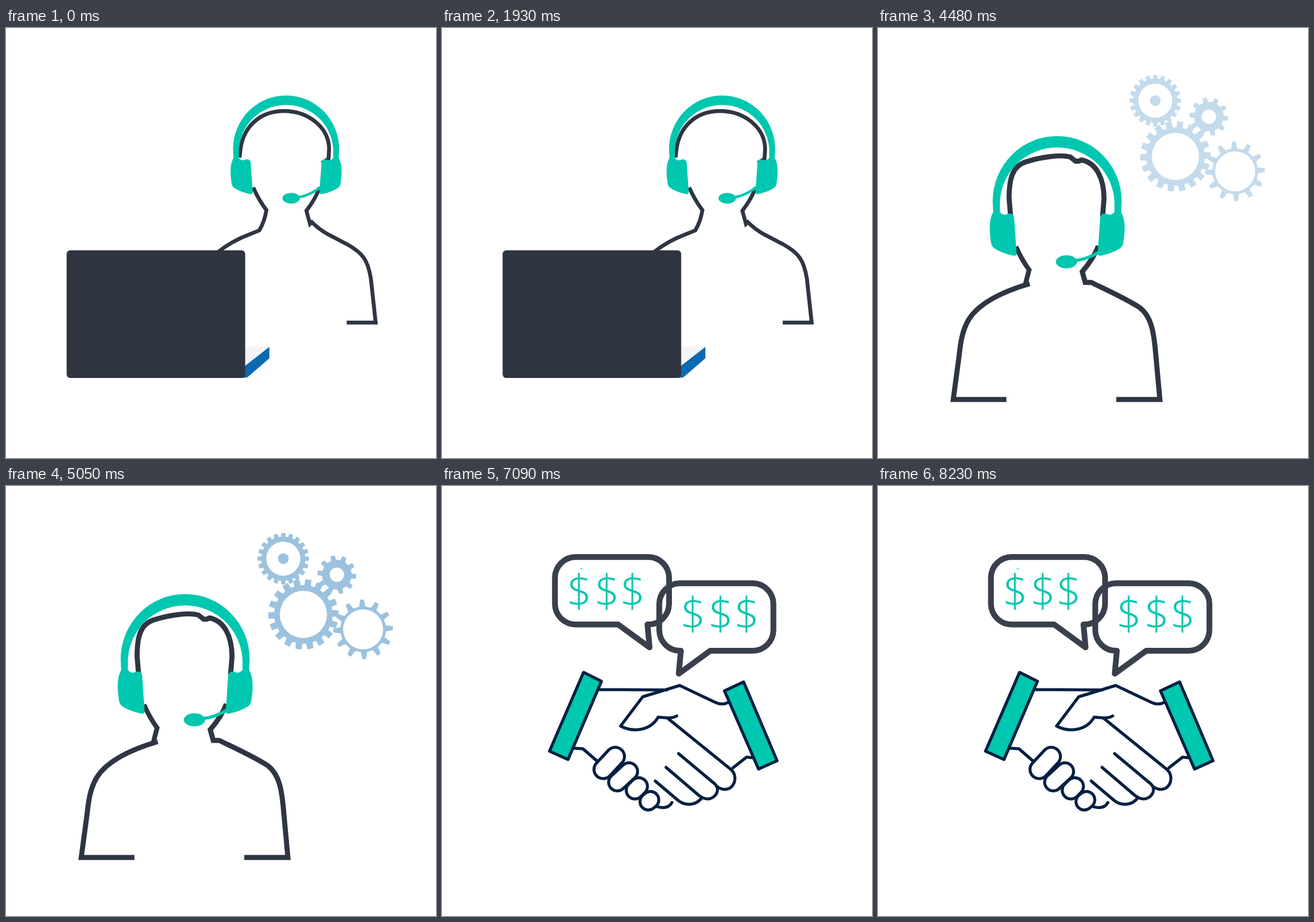
These frames come from a looping animation (720 by 720 pixels, 8260 ms). An HTML page with a canvas:

```html
<!DOCTYPE html>
<html lang="en">
<head>
<meta charset="utf-8">
<title>Support to deal</title>
<style>
html, body { margin: 0; width: 100%; height: 100%; overflow: hidden; background: #fff; }
canvas { display: block; width: 720px; height: 720px; }
</style>
</head>
<body>
<canvas id="stage" width="720" height="720"></canvas>
<script>
const ctx = document.getElementById('stage').getContext('2d');
const LOOP = 8260;
const DARK = '#2f3542', TEAL = '#00c7af', BLUE = '#0a69b1', NAVY = '#051f42', BUBBLE = '#3a3f4c';

function stroke(d, color, width, cap = 'butt', join = 'miter') {
  ctx.strokeStyle = color;
  ctx.lineWidth = width;
  ctx.lineCap = cap;
  ctx.lineJoin = join;
  ctx.stroke(new Path2D(d));
}

function fill(d, color) {
  ctx.fillStyle = color;
  ctx.fill(new Path2D(d), 'evenodd');
}

// Fades a whole group evenly by veiling it in white; call before the still parts.
function fadeGroup(alpha, draw) {
  if (alpha <= 0) return;
  draw();
  ctx.fillStyle = `rgba(255, 255, 255, ${1 - alpha})`;
  ctx.fillRect(0, 0, 720, 720);
}

// Piecewise linear value through [time, value] stops; 0 before the first one.
function track(t, stops) {
  if (t < stops[0][0]) return 0;
  for (let i = 1; i < stops.length; i++) {
    const [t0, v0] = stops[i - 1], [t1, v1] = stops[i];
    if (t < t1) return v0 + (v1 - v0) * (t - t0) / (t1 - t0);
  }
  return stops[stops.length - 1][1];
}

const EAR_CUP = 'M194 306L204 308Q209 314 215 312Q227 308 228 318L232 376Q232 383 226 381Q207 377 195 369Q190 366 189 358Q187 346 187 335Q187 317 194 306Z';

function headset(micX, micY, boomY) {
  fill('M193 310L192 290A108 109 0 0 1 408 290L407 310L396 309V295A96 95 0 0 0 204 295V309Z', TEAL);
  fill(EAR_CUP, TEAL);
  ctx.save();
  ctx.translate(600, 0);
  ctx.scale(-1, 1);
  fill(EAR_CUP, TEAL);
  ctx.restore();
  stroke(`M${micX + 14} ${micY - 2}Q${micX + 35} ${micY - 4} 372 ${boomY}`, TEAL, 5.5);
  ctx.beginPath();
  ctx.ellipse(micX, micY, 17.7, 11, 0, 0, 7);
  ctx.fill();
}

// A speech bubble with its tail at the lower right.
function bubble(bottom) {
  const side = bottom - 39;
  stroke(`M231 ${bottom}H152A39 39 0 0 1 112.5 ${side}V187A39 39 0 0 1 152 148H287A39 39 0 0 1 326.5 187V${side}A39 39 0 0 1 286 ${bottom}L290 317.5Z`,
    BUBBLE, 10.8, 'round', 'round');
}

function chat() {
  bubble(273);
  stroke('M155 182.3H263M158.5 209.8H193.5M235.5 209.8H290M213 237.2H290', BUBBLE, 10.8, 'round');
}

function agentAtDesk(t) {
  fadeGroup(track(t, [[970, 1], [1540, 1], [1930, 0]]), chat);
  stroke('M391 217Q392 206 394 195C402 160 430 139 465 139C508 139 541 168 541 203L540 219L529 226', DARK, 6.5);
  stroke('M414 267Q422 286 436 305Q433 324 424 339L409 345Q377 357 354 376', DARK, 6.5);
  stroke('M525 267Q519 285 503 306L509 328L512 325Q524 337 540 346L571 362C598 377 606 389 611 420L619 493.3H570.5', DARK, 6.5);
  ctx.save();
  ctx.translate(376, 113);
  ctx.scale(1 / 1.215, 1 / 1.213);
  ctx.translate(-187, -181);
  headset(310.3, 389.6, 366);
  ctx.restore();
  fill('M399 533H438L441 535L399 569Z', '#f4f5f6');
  fill('M441 534V553L404 585L396 586V569Z', BLUE);
  ctx.fillStyle = '#2e3440';
  ctx.beginPath();
  ctx.roundRect(101.5, 372.3, 299, 213.7, 6);
  ctx.fill();
}

// Tooth widths are shares of the pitch at the root and at the tip.
function gear(x, y, inner, root, tip, teeth, turn, rootWidth, tipWidth) {
  const step = Math.PI * 2 / teeth;
  const corners = [[root, -rootWidth], [tip, -tipWidth], [tip, tipWidth], [root, rootWidth]];
  ctx.beginPath();
  for (let i = 0; i < teeth; i++) {
    for (const [r, k] of corners) {
      const a = turn + (i + k / 2) * step;
      ctx.lineTo(x + r * Math.cos(a), y + r * Math.sin(a));
    }
  }
  ctx.closePath();
  ctx.moveTo(x + inner, y);
  ctx.arc(x, y, inner, 0, Math.PI * 2);
  ctx.fillStyle = BLUE;
  ctx.fill('evenodd');
}

function gears() {
  gear(464.3, 121.7, 28.5, 37, 43.2, 20, 0, .65, .5);
  ctx.beginPath();
  ctx.arc(464.3, 121.7, 9, 0, Math.PI * 2);
  ctx.fill();
  gear(554, 148.5, 12, 25, 32.5, 10, .09, .55, .35);
  gear(498, 215, 39.5, 49, 59, 18, -.03, .65, .5);
  gear(598, 240, 33.5, 38.5, 50, 12, -.04, .5, .25);
}

function agent(t) {
  fadeGroup(track(t, [[4000, 1], [4600, .05], [4750, .05], [5560, 1]]), gears);
  stroke('M222 315L219.5 285C219.5 250 226 231 248 224C270 217 305 211 322 216L331 223H336L341 221C366 226 378 252 378.5 285L376 316', DARK, 8.5);
  stroke('M231 366Q240 387 253 405L247 428', DARK, 8);
  stroke('M254 428C220 438 172 456 152 488C139 510 138 532 135 555L126 622H215', DARK, 8.5);
  stroke('M369 365Q361 386 342 408L347 426H357C386 440 415 453 438 468C460 484 462 518 464 535L472 622H399', DARK, 8.5);
  headset(315.5, 391.5, 374);
}

function finger(x0, y0, x1, y1, width) {
  const d = `M${x0} ${y0}L${x1} ${y1}`;
  stroke(d, NAVY, width, 'round');
  stroke(d, '#fff', width - 10, 'round');
}

function handshake() {
  const line = d => stroke(d, NAVY, 5, 'round', 'round');
  line('M264 341H300L376 341.5');
  line('M480 362Q469 368 457 362L398 334L336 353L299 402C320 413 349 410 362 387C374 388 385 390 393 385');
  line('M378 389L483 474C497 485 490 508 474 508Q467 508 460 503');
  line('M396 448L457 499C468 510 456 524 445 524Q438 524 430 518L375 471');
  line('M435 522C426 535 408 536 396 527L357 494');
  line('M487 472L510 454L520 455M221 439L236 440L259 460');
  line('M355 535Q377 544 385 530');
  finger(290, 453, 270, 474.5, 36);
  finger(313, 478, 293.5, 496, 34);
  finger(329.5, 503, 323, 509.5, 34);
  finger(349, 525.5, 345.5, 528.5, 33);
  for (const cuff of ['M237 312L267 327L211 458L180 444Z', 'M473 343L505 328L561 460L530 474Z']) {
    fill(cuff, TEAL);
    line(cuff);
  }
}

function offer(x, y, side, baseline, centers) {
  ctx.save();
  ctx.translate(x, y);
  ctx.scale(side * .893, .893);
  ctx.translate(-106.8, -142.5);
  bubble(274.5);
  ctx.restore();
  ctx.fillStyle = TEAL;
  ctx.font = '300 76px "Open Sans", sans-serif';
  ctx.textAlign = 'center';
  for (const cx of centers) ctx.fillText('$', cx, baseline);
}

function offers() {
  offer(184, 114, 1, 202.5, [229.5, 276, 319]);
  offer(560, 158, -1, 240.5, [420, 466.5, 510]);
  ctx.fillRect(232, 138, 4, 1);
}

function deal(t) {
  fadeGroup(track(t, [[7090, 1], [7660, .055], [7750, .055], [8230, 1]]), offers);
  handshake();
}

function render(now) {
  const t = now % LOOP;
  ctx.fillStyle = '#fff';
  ctx.fillRect(0, 0, 720, 720);
  (t < 3030 ? agentAtDesk : t < 5590 ? agent : deal)(t);
}

const start = performance.now();
function loop() {
  render(performance.now() - start);
  requestAnimationFrame(loop);
}
loop();
</script>
</body>
</html>
```
